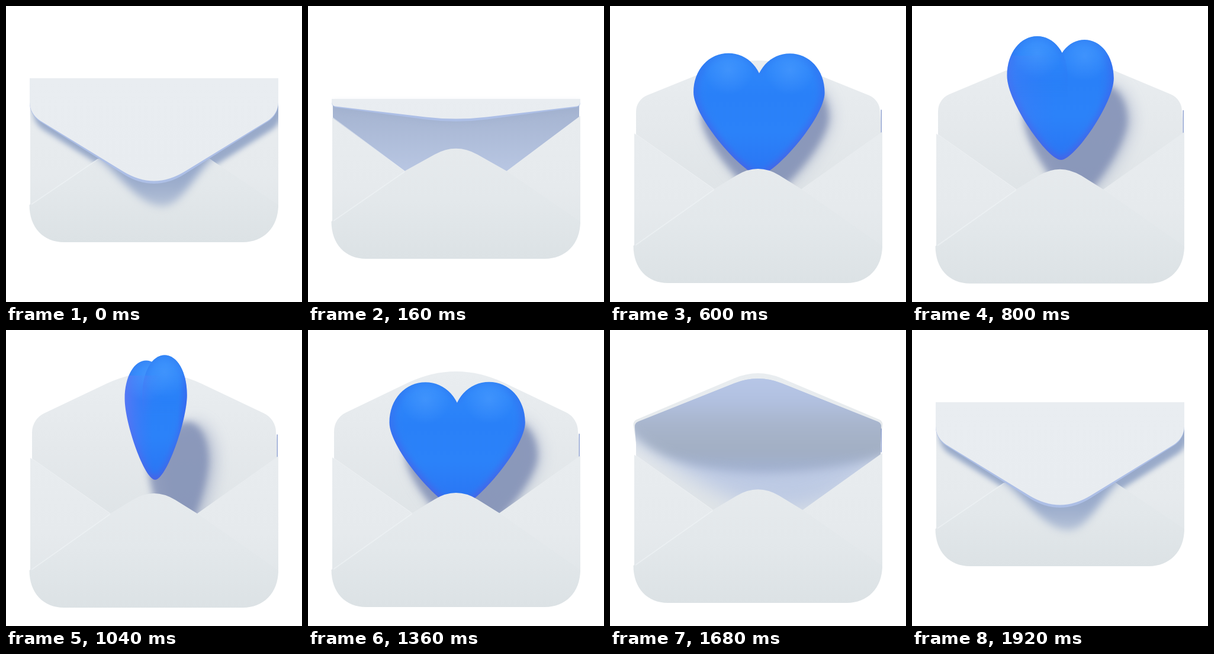
Write an HTML page with a canvas that moves like this. It is 500 by 500 pixels and loops after 1960 ms.

```html
<!DOCTYPE html>
<html lang="en">
<head>
<meta charset="utf-8">
<title>Envelope with heart</title>
<style>
html, body { margin: 0; width: 100%; height: 100%; overflow: hidden; background: #fff; }
canvas { display: block; width: 100vw; height: 100vh; }
</style>
</head>
<body>
<canvas id="stage" width="500" height="500"></canvas>
<script>
const ctx = document.getElementById('stage').getContext('2d');
const layer = Object.assign(document.createElement('canvas'), { width: 500, height: 500 });
const lx = layer.getContext('2d');
const LOOP = 1960, STEP = 40, TALL = 206;

const lerp = (a, b, u) => a + (b - a) * u;
const clamp = u => Math.max(0, Math.min(1, u));
const smooth = (a, b, t) => { const u = clamp((t - a) / (b - a)); return u * u * (3 - 2 * u); };

// Monotone cubic track through [time, value] pairs
function track(...k) {
  const n = k.length;
  const slope = i => (k[i + 1][1] - k[i][1]) / (k[i + 1][0] - k[i][0]);
  const tan = i => {
    if (i === 0 || i === n - 1) return 0;
    const a = slope(i - 1), b = slope(i);
    return a * b <= 0 ? 0 : 2 * a * b / (a + b);
  };
  return t => {
    if (t <= k[0][0]) return k[0][1];
    if (t >= k[n - 1][0]) return k[n - 1][1];
    let i = 0;
    while (t >= k[i + 1][0]) i++;
    const h = k[i + 1][0] - k[i][0], u = (t - k[i][0]) / h, v = 1 - u;
    return k[i][1] * v * v * (1 + 2 * u) + tan(i) * h * u * v * v
      + k[i + 1][1] * u * u * (3 - 2 * u) - tan(i + 1) * h * u * u * v;
  };
}

const drop = track([0, 0], [80, 5], [160, 28], [240, 53], [320, 64], [600, 69], [1040, 70],
  [1360, 69], [1600, 67], [1680, 62], [1760, 36], [1840, 8], [1920, 0]);
const flapTip = track([0, 300], [80, 284], [160, 195], [240, 74], [320, 11], [360, 1], [480, 48],
  [600, 92], [700, 92], [1040, 72], [1360, 70], [1480, 20], [1560, 6], [1680, 73],
  [1760, 190], [1840, 281], [1920, 300]);
const heartTop = track([340, 300], [440, 175], [600, 80], [760, 56], [1040, 47], [1100, 47],
  [1220, 58], [1360, 88], [1480, 185], [1580, 310]);
const shadeX = track([560, 8], [600, 10], [1040, 38], [1360, 24]);
const shadeY = track([600, 44], [1040, 112], [1360, 58]);

function grad(c, y0, y1, ...cols) {
  const g = c.createLinearGradient(0, y0, 0, y1);
  cols.forEach((col, i) => g.addColorStop(i / (cols.length - 1), col));
  return g;
}

function soft(c, blur, alpha, col, path) {
  c.save();
  c.filter = `blur(${blur}px)`;
  c.globalAlpha *= alpha;
  c.fillStyle = col;
  c.fill(path);
  c.restore();
}

function poly(...pts) {
  const p = new Path2D();
  pts.forEach(([x, y], i) => i ? p.lineTo(x, y) : p.moveTo(x, y));
  p.closePath();
  return p;
}

// Flap standing up when foot is given, folded down otherwise
function flapPath(hinge, tip, x0, round, corner, bend, foot = null) {
  const side = hinge + (tip - hinge) * bend, x1 = 500 - x0, up = foot !== null;
  const top = (tip - side * round / 420) / (1 - round / 420);
  const m = (side - top) / 210, p = new Path2D();
  const r = Math.min(corner, Math.abs(hinge - side) * 0.6);
  const base = up ? foot : hinge, neck = Math.min(base, side + 36);
  p.moveTo(up ? 44 : x0, base);
  if (up) p.lineTo(44, neck);
  p.arcTo(x0, side, 250, top, r);
  p.lineTo(250 - round, top + m * round);
  p.quadraticCurveTo(250, top, 250 + round, top + m * round);
  p.arcTo(x1, side, up ? 456 : x1, up ? side + 36 : hinge, r);
  if (up) p.lineTo(457, neck);
  p.lineTo(up ? 458 : x1, base);
  p.closePath();
  return p;
}

// One half of the heart, seen at spin angle a
function lobe(s, a, top, scale, dx = 0, dy = 0) {
  const k = scale * (1 + s * 52 * Math.sin(a) / 2300);
  const c = -s * 52 * Math.cos(a), w = Math.hypot(59 * Math.cos(a), 34 * Math.sin(a));
  const X = x => 252 + x * k + dx, Y = y => top + TALL * scale + (y - TALL) * k + dy;
  const l = c - w, r = c + w, p = new Path2D();
  p.moveTo(X(0), Y(TALL));
  p.bezierCurveTo(X(l * .12 - 12), Y(TALL), X(l), Y(109), X(l), Y(66));
  p.bezierCurveTo(X(l), Y(27), X(c - w * .55), Y(0), X(c), Y(0));
  p.bezierCurveTo(X(c + w * .55), Y(0), X(r), Y(27), X(r), Y(66));
  p.bezierCurveTo(X(r), Y(109), X(r * .12 + 12), Y(TALL), X(0), Y(TALL));
  p.closePath();
  return { path: p, x: X(c), y: Y(28), left: X(l), right: X(r) };
}

// Rim colour first, then a blurred, slightly smaller body on top
function inflate(lobes, top, turn) {
  const all = new Path2D();
  lobes.forEach(l => all.addPath(l.path));
  const left = Math.min(...lobes.map(l => l.left)), right = Math.max(...lobes.map(l => l.right));
  lx.globalCompositeOperation = 'source-over';
  lx.clearRect(0, 0, 500, 500);
  lx.fillStyle = grad(lx, top, top + TALL, '#2c7ef5', '#3a6df0', '#4a62e4');
  lx.fill(all);
  lx.globalCompositeOperation = 'source-atop';
  lx.save();
  const cx = (left + right) / 2, cy = top + 98;
  lx.translate(cx, cy);
  lx.scale(.93, .95);
  lx.translate(-cx, -cy);
  soft(lx, 6, 1, grad(lx, top, top + TALL, '#2f8afc', '#2980f8', '#2b82f9', '#2a75f4'), all);
  lx.restore();
  const side = lx.createLinearGradient(left, 0, right, 0);
  side.addColorStop(0, `rgba(98,120,245,${.8 * turn})`);
  side.addColorStop(.45, 'rgba(70,110,245,0)');
  side.addColorStop(.85, 'rgba(60,90,235,0)');
  side.addColorStop(1, `rgba(60,90,235,${.5 * turn})`);
  lx.fillStyle = side;
  lx.fillRect(0, top + 30, 500, 200);
  for (const l of lobes) {
    const g = lx.createRadialGradient(l.x, l.y, 0, l.x, l.y, 42);
    g.addColorStop(0, 'rgba(90,165,255,.4)');
    g.addColorStop(1, 'rgba(90,165,255,0)');
    lx.fillStyle = g;
    lx.fillRect(0, 0, 500, 500);
  }
}

function drawHeart(t, inside, floor) {
  const a = Math.PI * smooth(520, 1440, t), top = heartTop(t), turn = Math.sin(a) ** 2;
  const scale = lerp(1, 1.035, smooth(1040, 1360, t));
  const halves = [lobe(-1, a, top, scale), lobe(1, a, top, scale)];

  ctx.save();
  ctx.clip(inside);
  const dx = shadeX(t), dy = shadeY(t);
  for (const [blur, alpha, x] of [[12, .4, dx + 6 + 8 * turn], [6, .75, dx]]) {
    const sh = new Path2D();
    [-1, 1].forEach(s => sh.addPath(lobe(s, a, top, scale * .97, x, dy).path));
    soft(ctx, blur, alpha, '#7b8ab2', sh);
  }
  ctx.restore();

  ctx.save();
  ctx.beginPath();
  ctx.rect(0, 0, 500, floor);
  ctx.clip();
  inflate(halves, top, turn);
  ctx.drawImage(layer, 0, 0);
  // The nearer half stands out at the top and melts in below
  if (turn > .01) {
    inflate([halves[1]], top, turn * .6);
    lx.globalCompositeOperation = 'destination-in';
    lx.fillStyle = grad(lx, top + 15, top + 100, '#000f', '#0000');
    lx.fillRect(0, 0, 500, 500);
    ctx.globalAlpha = turn;
    ctx.drawImage(layer, 0, 0);
  }
  ctx.restore();
}

function drawInside(t, hinge, tip, lit, foot) {
  const x0 = lerp(38.5, 44, lit), round = lerp(40, 80, lit), corner = lerp(9, 40, lit);
  const bend = lerp(.36, .43, lit);
  const outer = flapPath(hinge, tip, x0, round, corner, bend, foot);
  ctx.fillStyle = grad(ctx, tip, foot, '#e9edf0', '#e5e9ec', '#dfe4e7');
  ctx.fill(outer);
  if (lit < 1) {
    const deep = 1 - smooth(180, 320, t) + smooth(1460, 1640, t);
    const inner = flapPath(hinge, tip + lerp(6, 9, deep), x0 + 3, round, corner, bend, foot);
    ctx.save();
    ctx.clip(inner);
    ctx.globalAlpha = 1 - lit;
    const low = hinge + lerp(22, 74, deep);
    const wide = new Path2D();
    wide.moveTo(20, -30);
    wide.lineTo(480, -30);
    wide.lineTo(480, hinge - 6);
    wide.bezierCurveTo(390, lerp(hinge - 34, low + 38, deep), 290, lerp(hinge - 20, low + 42, deep), 250, low + 22 * deep);
    wide.bezierCurveTo(190, low + 16, 80, hinge + 16, 20, hinge - 36);
    soft(ctx, 17, lerp(.65, .8, deep), '#b5c4e3', wide);
    const core = new Path2D();
    core.moveTo(0, -30);
    core.lineTo(500, -30);
    core.lineTo(500, hinge);
    core.bezierCurveTo(400, lerp(hinge - 38, hinge + 36, deep), 320, lerp(hinge - 36, hinge + 42, deep), 250, hinge + lerp(-10, 42, deep));
    core.bezierCurveTo(160, hinge + lerp(-4, 38, deep), 80, hinge + lerp(-8, 24, deep), 30, hinge - 34);
    soft(ctx, lerp(10, 8, deep), 1,
      grad(ctx, tip, hinge + 45, '#b7c7e8', '#b2c1e1', '#a8b5cc', '#a2afc3', '#a0b0d2'), core);
    ctx.restore();
  }
  ctx.fillStyle = '#8fa1d0';
  ctx.fillRect(457.5, hinge - 33, 1.5, 40);
  return outer;
}

function drawFront(s, q) {
  const b = 399 + s, crease = b - 63, jx = lerp(155, 176, q), jy = lerp(258, 310, q);
  const apex = lerp(208, 265, q), edge = lerp(170, 216, q);
  ctx.fillStyle = grad(ctx, edge, b, '#e8ecef', '#e6eaed', '#dee4e7');
  ctx.fill(poly([41, edge], [jx, jy], [jx + 4, jy + 8], [41, crease + 5]));
  ctx.fill(poly([460, edge - 3], [499 - jx, jy], [495 - jx, jy + 8], [460, crease + 5]));
  ctx.strokeStyle = 'rgba(247,250,252,.5)';
  ctx.lineWidth = 1;
  ctx.beginPath();
  ctx.moveTo(42, edge);
  ctx.lineTo(jx, jy);
  ctx.stroke();

  const m = (jy - apex) / (250 - jx), y = apex + m * 36, p = new Path2D();
  p.moveTo(39.5, crease);
  p.lineTo(jx, jy);
  p.lineTo(214, y);
  p.quadraticCurveTo(250, apex, 286, y);
  p.lineTo(499 - jx, jy);
  p.lineTo(460, crease);
  p.bezierCurveTo(460, b - 25, 435, b, 400, b);
  p.lineTo(98, b);
  p.bezierCurveTo(63, b, 39.5, b - 25, 39.5, crease);
  ctx.fillStyle = grad(ctx, apex, b, '#e6eaed', '#e3e8eb', '#dce2e5');
  ctx.fill(p);
  ctx.strokeStyle = 'rgba(244,247,249,.5)';
  ctx.lineWidth = 2;
  ctx.beginPath();
  ctx.moveTo(43, crease - 1);
  ctx.lineTo(jx, jy + 1);
  ctx.stroke();
  const seam = [[40, crease], [jx, jy], [499 - jx, jy], [460, crease]];
  return { pocket: p, sides: poly(...seam, [460, 122], [40, 122]) };
}

function drawClosed(hinge, tip, front) {
  const near = clamp((tip - hinge) / 178), bend = .35;
  const Y = y => hinge + (y - 122) * near;
  const flap = flapPath(hinge, tip, 40, 52, 42, bend);

  ctx.save();
  ctx.clip(front.sides);
  ctx.translate(6 * near, 14 * near);
  soft(ctx, 4, .95 * near, '#95a7c8', flap);
  ctx.restore();

  ctx.save();
  ctx.clip(front.pocket);
  const sh = new Path2D();
  sh.moveTo(140, Y(244));
  sh.bezierCurveTo(188, Y(276), 222, Y(338), 264, Y(338));
  sh.bezierCurveTo(298, Y(338), 316, Y(284), 362, Y(244));
  sh.closePath();
  soft(ctx, 7, near, grad(ctx, Y(255), Y(345), '#93a5c8', '#9cadcc', '#b9c5d9'), sh);
  ctx.restore();

  ctx.fillStyle = '#adbfe6';
  ctx.fill(flap);
  ctx.fillStyle = grad(ctx, hinge, tip, '#e9edf1', '#e8ecf0');
  ctx.fill(flapPath(hinge, Math.max(hinge, tip - 4.5), 40, 52, 42, bend));
}

function draw(t) {
  const s = drop(t), q = s / 70, tip = flapTip(t), hinge = 122 + 1.25 * s;
  const lit = smooth(320, 520, t) * (1 - smooth(1400, 1620, t));
  const open = tip < hinge;
  ctx.fillStyle = '#fff';
  ctx.fillRect(0, 0, 500, 500);

  const foot = lerp(262, 314, q);
  if (open) {
    const inside = drawInside(t, hinge, tip, lit, foot);
    if (t > 340 && t < 1580) drawHeart(t, inside, 370 + s);
  } else {
    ctx.fillStyle = grad(ctx, hinge, foot, '#a2b1ce', '#b9c7e3');
    ctx.fillRect(42, hinge, 416, foot - hinge);
  }
  const front = drawFront(s, q);
  if (!open) drawClosed(hinge, tip, front);
}

const start = performance.now();
function tick(now) {
  const t = Math.max(0, now - start) % LOOP;
  draw(Math.floor(t / STEP) * STEP);
  requestAnimationFrame(tick);
}
draw(0);
requestAnimationFrame(tick);
</script>
</body>
</html>
```
